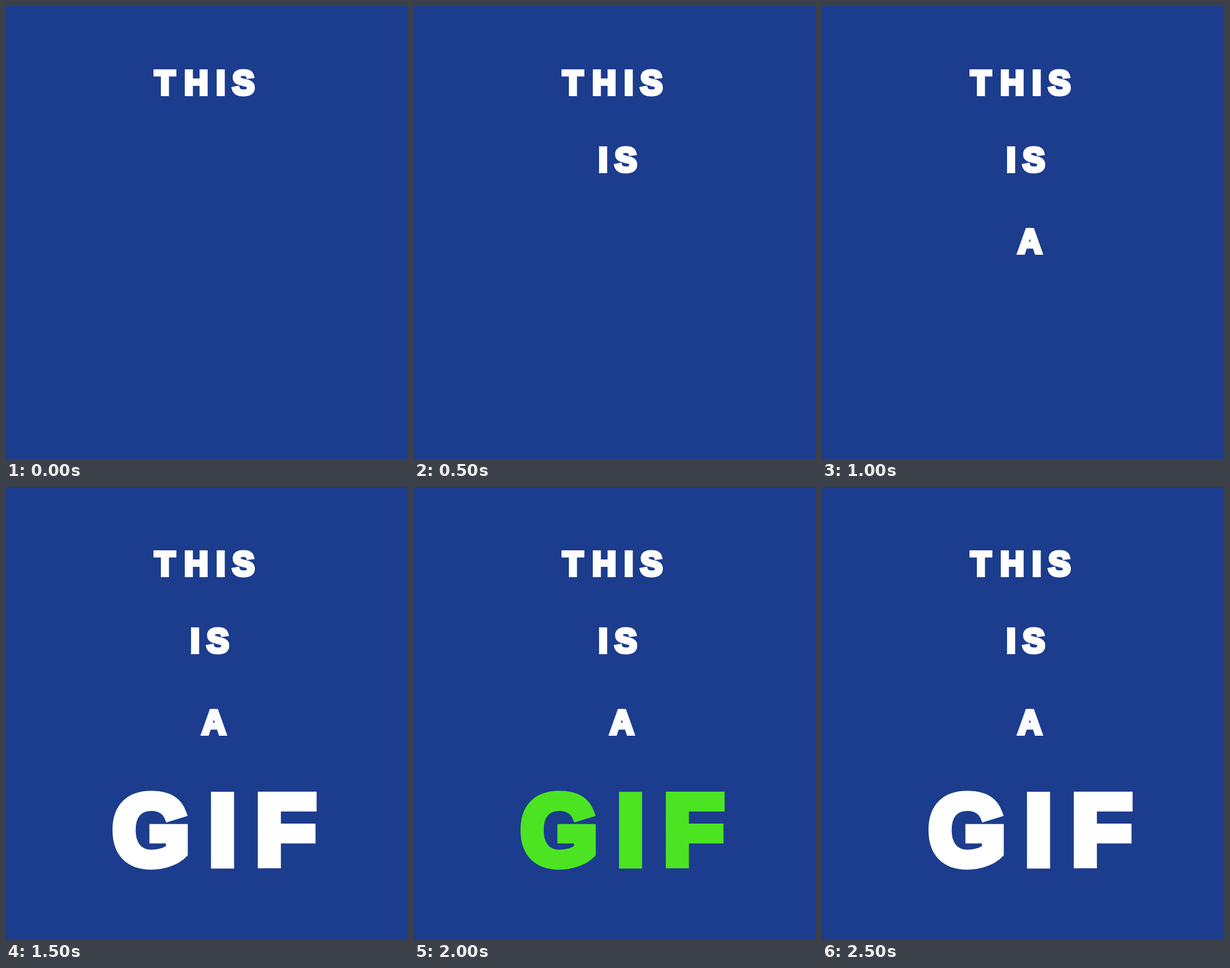
An HTML page for the animation above (3000 ms loop, 706 px wide and 794 px high).

```html
<!DOCTYPE html>
<html lang="en">
<head>
<meta charset="utf-8">
<title>This is a GIF</title>
<style>
  html, body { margin: 0; width: 100%; height: 100%; overflow: hidden; background: #1c3c8e; }
  svg { display: block; width: 706px; height: 794px; }
  /* The outline thickens the bold face to a black weight. */
  text {
    font: bold 58.4px "Liberation Sans", Arial, sans-serif;
    text-anchor: middle;
    fill: currentColor;
    stroke: currentColor;
    stroke-width: 5.8px;
    stroke-linejoin: miter;
    color: #fff;
  }
  .big { font-size: 172.8px; stroke-width: 15.6px; }
</style>
</head>
<body>
<svg viewBox="0 0 706 794">
  <text x="279 334 377 417" y="155.1">THIS</text>
  <text x="332 372" y="290.1">IS</text>
  <text x="365" y="433.1">A</text>
  <text class="big" x="255 380.3 491.2" y="661.2">GIF</text>
</svg>
<script>
  const STEP = 500, STEPS = 6, GREEN_STEP = 4;
  const words = [...document.querySelectorAll("text")];
  const big = words[words.length - 1];

  function draw() {
    const step = Math.floor(performance.now() / STEP) % STEPS;
    words.forEach((word, i) => {
      word.style.visibility = step >= i ? "visible" : "hidden";
    });
    big.style.color = step === GREEN_STEP ? "#4ce422" : "#fff";
    requestAnimationFrame(draw);
  }
  draw();
</script>
</body>
</html>
```
